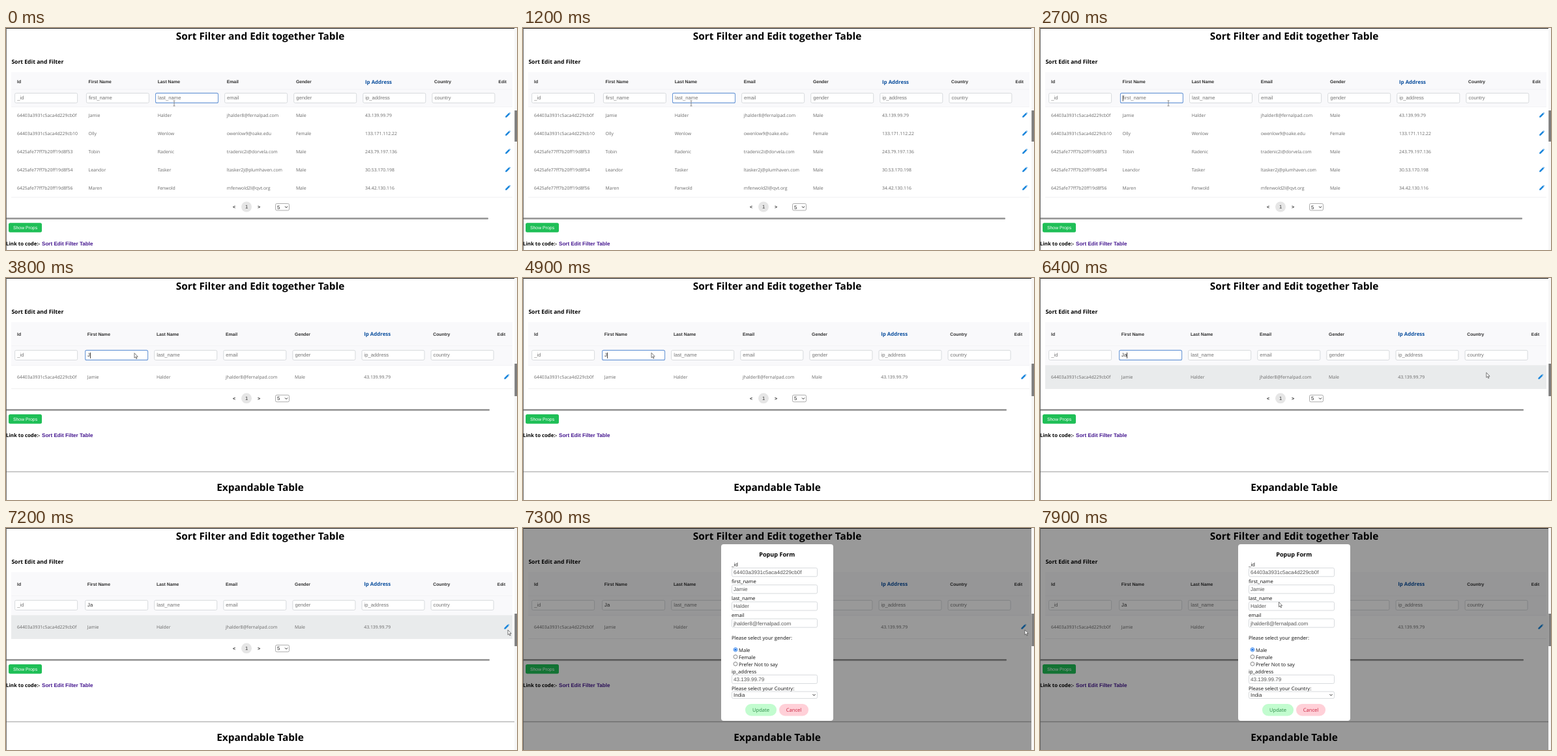
An HTML page for the animation above (8000 ms loop, 784 px wide and 342 px high).

```html
<!DOCTYPE html>
<html lang="en">
<head>
<meta charset="utf-8">
<title>Sort Filter and Edit together Table</title>
<style>
  html, body { margin: 0; height: 100%; overflow: hidden; background: #fff; }
  svg { display: block; width: 100%; height: 100%; }
  text { font-family: "Open Sans", "Noto Sans", sans-serif; text-rendering: geometricPrecision; white-space: pre; }
  .b { font-weight: 700; }
  .a { font-family: "Liberation Sans", Arial, sans-serif; }
  .m { text-anchor: middle; }
  .box { fill: #fff; stroke: #d3d6da; stroke-width: .9; }
  .focus { stroke: #6f9bd8; stroke-width: 1.1; }
</style>
</head>
<body>
<svg id="stage" viewBox="0 0 784 342" preserveAspectRatio="none"></svg>
<script>
const LOOP = 8000, BLINK = 530;
const FOCUS = 2340, KEY_J = 3800, KEY_A = 5000, HOVER = 6300, BLUR = 7100, POPUP = 7300;

const heads = ['Id', 'First Name', 'Last Name', 'Email', 'Gender', 'Ip Address', 'Country'];
const fields = ['_id', 'first_name', 'last_name', 'email', 'gender', 'ip_address', 'country'];
const rows = [
  ['64403a3931c5aca4d229cb0f', 'Jamie', 'Halder', 'jhalder8@fernalpad.com', 'Male', '43.139.99.79'],
  ['64403a3931c5aca4d229cb10', 'Olly', 'Wenlow', 'owenlow9@oake.edu', 'Female', '133.171.112.22'],
  ['6425afe77ff7b20ff19d8f53', 'Tobin', 'Radenic', 'tradenic2i@dorvela.com', 'Male', '243.79.197.136'],
  ['6425afe77ff7b20ff19d8f54', 'Leandor', 'Tasker', 'ltasker2j@plumhaven.com', 'Male', '30.53.170.198'],
  ['6425afe77ff7b20ff19d8f56', 'Maren', 'Fenwold', 'mfenwold2l@qvt.org', 'Male', '34.42.130.116'],
];

const text = (s, x, y, size, fill = '#000', cls = '') =>
  `<text x="${x}" y="${y}" font-size="${size}" fill="${fill}" class="${cls}">${s.replace('<', '&lt;')}</text>`;
const rect = (x, y, w, h, fill, r = 0) =>
  `<rect x="${x}" y="${y}" width="${w}" height="${h}" rx="${r}" fill="${fill}"/>`;
const box = (x, y, w, h, focus) =>
  `<rect x="${x}" y="${y}" width="${w}" height="${h}" rx="2" class="box${focus ? ' focus' : ''}"/>`;
const chevron = (x, y) =>
  `<path d="M${x - 2} ${y - 1}l2 2 2-2" fill="none" stroke="#222" stroke-width="1"/>`;
const pencil = (x, y) =>
  `<path transform="translate(${x} ${y})" fill="#1a86dc" d="M-3.8 3.8V1.9L1.4-3.3 3.3-1.4-1.9 3.8ZM2-3.8Q2.6-4.3 3.2-3.8L3.9-3.1Q4.3-2.5 3.8-2Z"/>`;

function pager(y) {
  return text('<', 350, y + 2.3, 7, '#222', 'a b m') +
    `<circle cx="369" cy="${y}" r="8" fill="#e6e6e6"/>` +
    text('1', 369, y + 2.8, 7.6, '#333', 'a m') +
    text('>', 388, y + 2.3, 7, '#222', 'a b m') +
    `<rect x="413.5" y="${y - 5}" width="21" height="10.5" rx="2" fill="#fff" stroke="#999" stroke-width=".8"/>` +
    text('5', 416, y + 3, 7.8, '#222', 'a') + chevron(430, y + .3);
}

function footer(y, barWidth) {
  return rect(0, y, barWidth, 2.6, '#929292', 1) +
    rect(4, y + 8, 51, 14.5, '#1fbf57', 2.5) +
    text('Show Props', 29.5, y + 17.8, 6.9, '#fff', 'a m') +
    text('Link to code:-', 0, y + 42.5, 7.8, '#000', 'b') +
    text('Sort Edit Filter Table', 55, y + 42.5, 8.1, '#44168f', 'a b');
}

// filtered: taller header with one row; otherwise the full list
function table(filtered, focus, query, caret, hover) {
  const dx = filtered ? -1.8 : 0, headY = filtered ? 89 : 85.4;
  const inputY = filtered ? 111.4 : 100.4, rowY = filtered ? 155.2 : 137.2;
  const headEnd = filtered ? 134.5 : 121;
  const colX = i => i ? 126.6 + dx + 106.1 * (i - 1) : 17;
  let s = rect(8, 68, 769, headEnd - 68, '#f9f9fb') +
    rect(8, filtered ? 104 : 94, 769, .6, '#f0f0f3') + rect(8, headEnd, 769, .6, '#ececef');
  heads.forEach((h, i) => {
    const x = colX(i), inX = i ? x - 3.2 : 13.6, typed = i == 1 && query;
    s += h == 'Ip Address' ? text(h, x, headY + .3, 7.9, '#0b4f9e', 'b') : text(h, x, headY, 6.8, '#2d2d2d', 'a b');
    s += box(inX, inputY, 96, 15, i == focus) +
      text(typed || fields[i], x + .3, inputY + 10, 7.7, typed ? '#333' : '#757575', 'a');
    if (i == 1 && caret) s += rect(x + .2 + [0, 4.2, 8.2][query.length], inputY + 3.4, .8, 9, '#111');
  });
  s += text('Edit', 755.6 + dx, headY - .4, 6.5, '#2d2d2d', 'a b');
  if (hover) s += rect(8, 134.5, 769, 36, '#e9ebec');
  rows.slice(0, filtered ? 1 : 5).forEach((row, r) => {
    const y = rowY + 28 * r;
    row.forEach((v, i) => s += text(v, colX(i), y, 6.9, '#686868'));
    s += pencil(770 + dx, y - 3.2);
  });
  return s + rect(8, filtered ? 170 : 260.6, 769, .6, '#e6e6e8');
}

function popup() {
  const r = rows[0], label = (s, y, x = 320) => text(s, x, y, 7.65, '#111');
  const field = (name, value, y) => label(name, y) + box(320.5, y + 2.6, 131, 13.2) +
    text(value, 323, y + 12.2, 8.1, '#555', 'a');
  const pill = (s, x, w, bg, fg) => rect(x, 271, w, 18.5, bg, 9) + text(s, x + w / 2, 283.3, 7.6, fg, 'm');
  let s = rect(0, 0, 780, 342, 'rgba(0,0,0,.4)') + rect(304, 25, 172, 272, '#fff', 4) +
    text('Popup Form', 389.7, 43.6, 9.1, '#000', 'b m');
  [0, 1, 2, 3].forEach(i => s += field(fields[i], r[i], 59 + 26.1 * i));
  s += label('Please select your gender:', 171.6);
  ['Male', 'Female', 'Prefer Not to say'].forEach((g, i) => {
    const y = 187.4 + 11 * i;
    s += `<circle cx="326" cy="${y}" r="2.9" fill="#fff" stroke="${i ? '#777' : '#1a73e8'}" stroke-width=".9"/>`;
    if (!i) s += `<circle cx="326" cy="${y}" r="1.7" fill="#1a73e8"/>`;
    s += label(g, y + 3.4, 331);
  });
  return s + field('ip_address', r[5], 223.8) + label('Please select your Country:', 249.8) +
    box(320.5, 252, 131, 10.6) + text('India', 323, 260.2, 8, '#333', 'a') + chevron(446.5, 257.2) +
    pill('Update', 341, 48, '#c2fccf', '#2c8a48') + pill('Cancel', 393, 45, '#ffd0d8', '#c8203c');
}

// cursor stops: time, x, y
const path = [[0, 258, 116], [2100, 258, 116], [2330, 197, 116], [5950, 197, 115], [6200, 638, 139.5],
  [6700, 770, 157], [7450, 770, 157], [7850, 366.5, 114], [8000, 366.5, 114]];

function cursor(t) {
  const i = path.findIndex(p => p[0] > t), [t0, x0, y0] = path[i - 1], [t1, x1, y1] = path[i];
  const u = (t - t0) / (t1 - t0), k = u * u * (3 - 2 * u);
  const at = `transform="translate(${x0 + (x1 - x0) * k} ${y0 + (y1 - y0) * k})"`;
  return t < KEY_J
    ? `<path ${at} d="M-1.5-4h3M0-4v8M-1.5 4h3" fill="none" stroke="#777" stroke-width=".8"/>`
    : `<path ${at} d="M0 0V7.6L1.7 6 2.9 8.8 4.1 8.3 2.9 5.6H5.2Z" fill="#fff" stroke="#444" stroke-width=".7"/>`;
}

function scene(t) {
  const filtered = t >= KEY_J, query = t >= KEY_A ? 'Ja' : filtered ? 'J' : '';
  const focus = t < FOCUS ? 2 : t < BLUR ? 1 : -1;
  const start = t >= KEY_A ? KEY_A : filtered ? KEY_J : FOCUS;
  const caret = focus == 1 && (t - start) % (2 * BLINK) < BLINK;
  const hover = t >= HOVER && t < POPUP;
  let s = rect(0, 0, 784, 342, '#fff') +
    text('Sort Filter and Edit together Table', 390, 18, 15.4, '#000', 'b m') +
    text('Sort Edit and Filter', 8.4, 55, 8.6, '#000', 'b') +
    table(filtered, focus, query, caret, hover) + pager(filtered ? 185.3 : 275.5);
  s += filtered
    ? footer(202, 742) + rect(0, 297.8, 780, 1.4, '#b4b4b4') +
      text('Expandable Table', 390, 328, 15.4, '#000', 'b m')
    : footer(292.2, 740);
  if (t >= POPUP) s += popup();
  return s + rect(0, 0, 780, 1, '#111') + rect(0, 0, .8, 342, '#555') +
    rect(780, 0, 4, 342, '#f7f7f7') + rect(780.3, filtered ? 132 : 127, 3.7, filtered ? 50 : 48, '#7d7d7d') +
    cursor(t);
}

const stage = document.getElementById('stage');
function frame() {
  stage.innerHTML = scene(performance.now() % LOOP);
  requestAnimationFrame(frame);
}
frame();
</script>
</body>
</html>
```
